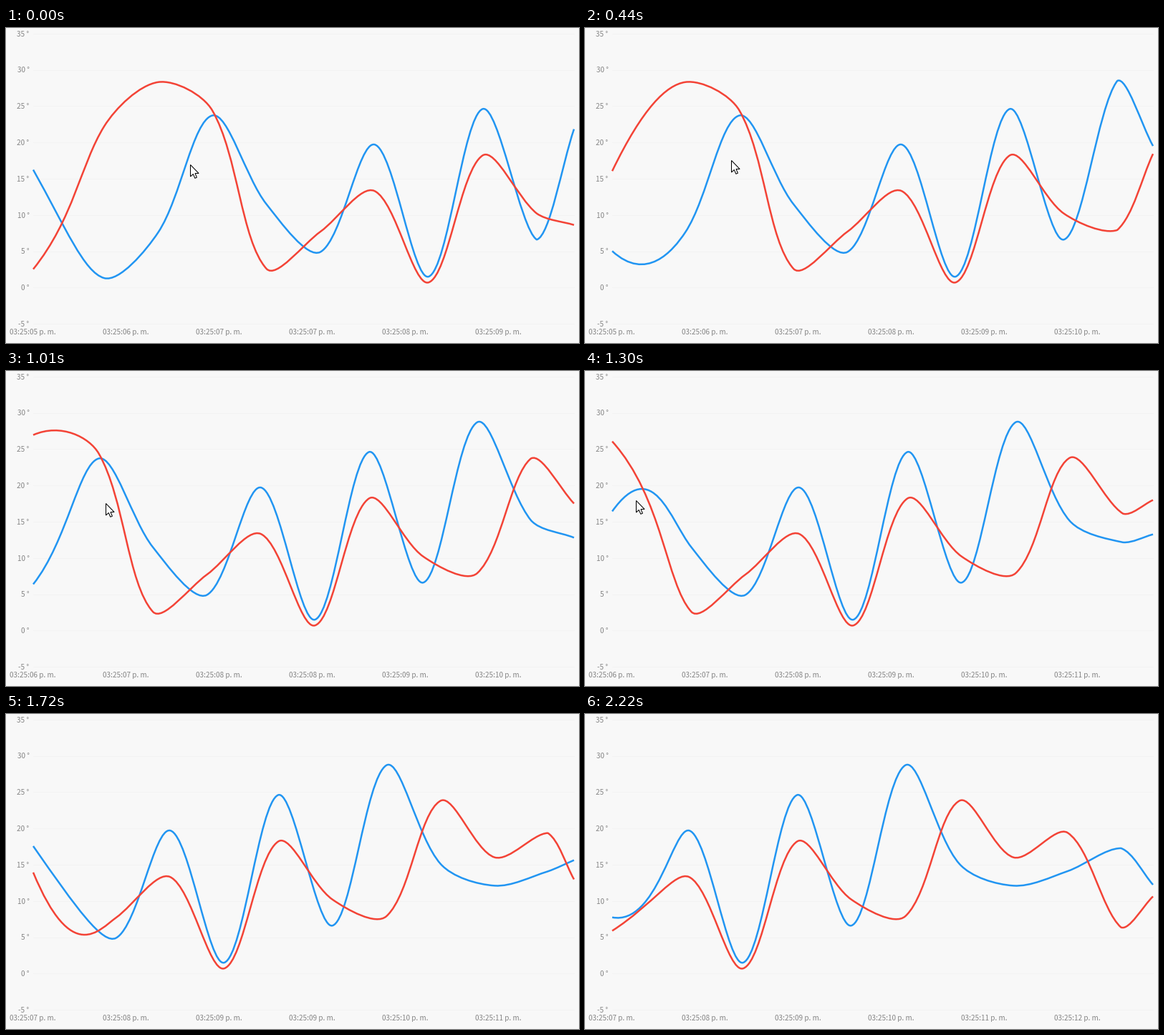
These frames come from a looping animation (800x441 px, 2.32 s). A matplotlib script:

```python
import numpy as np
import matplotlib.pyplot as plt
from matplotlib.animation import FuncAnimation
from matplotlib.patches import PathPatch, Polygon
from matplotlib.path import Path

W, H, DPI = 800, 441, 100
LOOP, TICK = 2320, 10
LEFT, RIGHT, SLOTS = 38, 793, 11
GAP = (RIGHT - LEFT) / (SLOTS - 1)
SMOOTH = 0.65      # line smoothness
REACH = 0.97       # share of a slide done when the next reading arrives
ROWS = 3 * (SLOTS - 1) + 1
CODES = [Path.MOVETO] + [Path.CURVE4] * (ROWS - 1)

# Sensor readings in degrees, one per chart update
BLUE = [26, 11.8, 1.3, 7.6, 23.7, 11.5, 4.9, 19.7, 1.5, 24.6, 6.6,
        28.7, 15.1, 12.1, 14.1, 17.3, 8.8]
RED = [-1.4, 4.3, 22.2, 28.3, 24.4, 2.6, 7.7, 13.3, 0.7, 18.2, 10.2,
       7.9, 23.8, 16, 19.4, 6.2, 13.4]

# Key poses: time, readings taken in, pointer x and y
KEYS = np.array([(0, 0.71, 257, 191), (440, 1.68, 204, 185),
                 (1010, 2.82, 139, 185), (1300, 3.57, 71, 181),
                 (1550, 4.12, -8, 455), (2220, 5.61, -8, 455)]).T
ARROW = np.array([(0, 0), (0, 16.5), (3.8, 13), (6.3, 18.8), (8.9, 17.7),
                  (6.5, 12), (11.6, 12)])


def y_px(deg):
    return 363.3 - 10.16 * np.asarray(deg)


def outline(values):
    """Bezier rows of the visible slots, ending in an empty segment.

    Older readings still shape the tangent at the left edge.
    """
    x = RIGHT - GAP * np.arange(len(values))[::-1]
    pts = np.column_stack([x, y_px(values)])
    pad = np.vstack([pts[:1], pts, pts[-1:]])
    mid = (pad[:-1] + pad[1:]) / 2
    size = np.hypot(*np.diff(pad, axis=0).T)
    k = (size[:-1] / (size[:-1] + size[1:]))[:, None]
    bend = mid[:-1] + (mid[1:] - mid[:-1]) * k
    before = pts + (mid[:-1] - bend) * SMOOTH
    after = pts + (mid[1:] - bend) * SMOOTH
    segments = np.stack([after[:-1], before[1:], pts[1:]], axis=1)
    rows = np.vstack([pts[:1], segments.reshape(-1, 2), [pts[-1]] * 3])
    return rows[-ROWS - 3:]


def slides(values):
    """Old and new outline for each arriving reading."""
    state = outline(values[:SLOTS])
    pairs = []
    for count in range(SLOTS + 1, len(values) + 1):
        goal = outline(values[:count])
        old = np.vstack([state[:1], state[4:], [state[-1]] * 3])
        pairs.append((old, goal))
        state = old + (goal - old) * REACH
    return pairs


fig = plt.figure(figsize=(W / DPI, H / DPI), dpi=DPI, facecolor="#f8f8f8")
ax = fig.add_axes([0, 0, 1, 1])
ax.set_xlim(0, W)
ax.set_ylim(H, 0)
ax.axis("off")

FONT = dict(family="Noto Sans CJK JP", size=7.2, color="#858585",
            va="baseline")
for deg in range(-5, 36, 5):
    y = y_px(deg)
    ax.plot([LEFT, RIGHT], [y, y], color="#f3f3f3", lw=0.72, zorder=1)
    ax.text(32.5, y + 3.8, f"{deg} °", ha="right", **FONT)
labels = [ax.text(37.2 + 130 * i, 429.4, "", ha="center", **FONT)
          for i in range(6)]


def add_line(values, color, z):
    line = PathPatch(Path([(0, 0)]), fill=False, ec=color, lw=1.8,
                     joinstyle="round", capstyle="butt", zorder=z)
    ax.add_patch(line)
    return line, slides(values)


lines = [add_line(BLUE, "#2195f2", 2), add_line(RED, "#f34336", 3)]
pointer = Polygon(ARROW, closed=True, fc="white", ec="black", lw=0.75,
                  joinstyle="miter", zorder=5)
ax.add_patch(pointer)


def draw(n):
    read, *tip = [np.interp(n * TICK, KEYS[0], row) for row in KEYS[1:]]
    k = int(read)
    part = (read - k) * REACH
    for line, pairs in lines:
        old, goal = pairs[k]
        shape = old + (goal - old) * part
        line.set_path(Path(shape[:ROWS], CODES))
    for i, label in enumerate(labels):
        second = int(5.3 + 0.505 * k + 0.87 * i)
        label.set_text(f"03:25:{second:02d} p. m.")
    pointer.set_xy(ARROW + tip + 0.5)
    return [line for line, _ in lines] + labels + [pointer]


anim = FuncAnimation(fig, draw, frames=LOOP // TICK, interval=TICK,
                     repeat=True, repeat_delay=0, blit=False)
plt.show()
```
